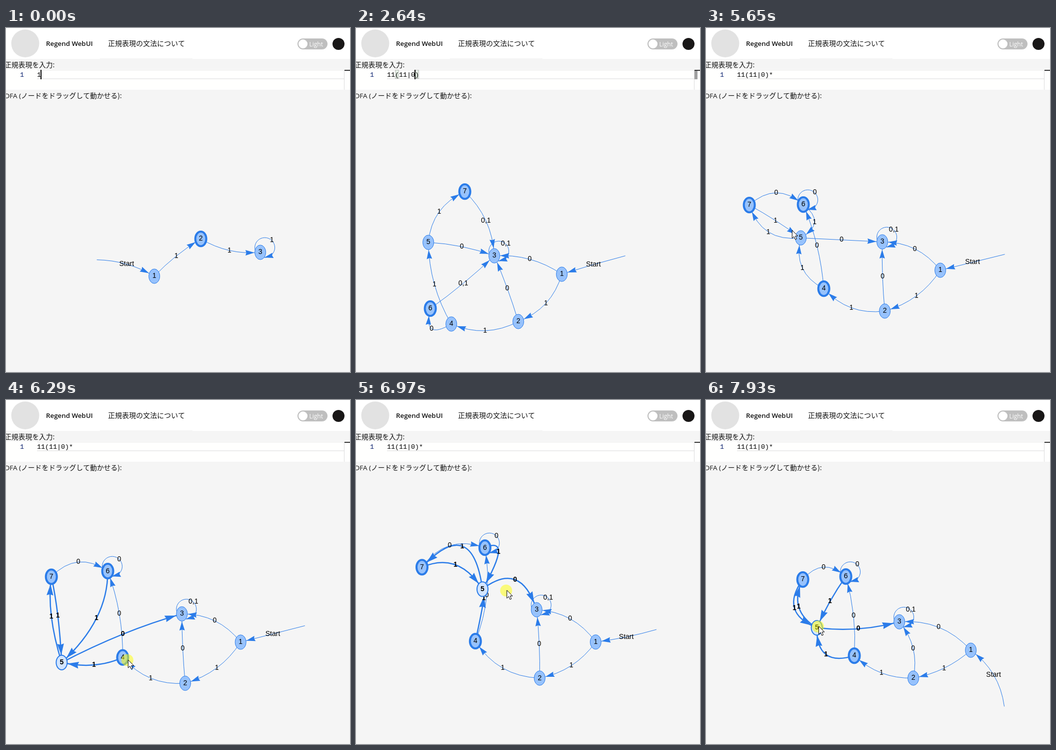
An HTML page with a canvas that plays this animation: 688 px wide and 691 px high, repeating every 8000 ms.

```html
<!DOCTYPE html>
<html lang="ja">
<meta charset="utf-8">
<title>Regend WebUI</title>
<style>
html, body { margin: 0; width: 100%; height: 100%; overflow: hidden; background: #f5f5f5; }
canvas { display: block; }
</style>
<canvas id="stage" width="688" height="691"></canvas>
<script>
const ctx = document.getElementById('stage').getContext('2d');
const LOOP = 8000, FRAME = 68.5, LAST = 7930, HOVER = 4970, GRAB = 5790, BLINK = 530;
const BLUE = '#2b7ce9', RX = 11, RY = 14.6;
const UI = '"Open Sans", "Noto Sans", "Noto Sans CJK JP", sans-serif';
const JP = '"Noto Sans CJK JP", "Noto Sans", sans-serif';
const MONO = '13.333px "Liberation Mono", monospace';
const ARIAL = '14px "Liberation Sans", sans-serif';

const mix = (p, q, k) => p.map((v, i) => v + (q[i] - v) * k);

// ---- graphs: node 0 is the invisible start; each edge bows sideways by its bend ----
const pose = (nodes, bends, drift = [0, 0]) => ({
  nodes: nodes.split(' ').map(p => p.split(',').map(Number)),
  bends: bends.split(' ').map(Number),
  drift // slack of the held node's edges
});
const graph = (accept, edges, pose) => ({
  accept, pose,
  edges: edges.split(' ').map(e => ({ a: +e[0], b: +e[1], label: e.slice(3) }))
});

// A plain run of 1s: n nodes in a row, the last one a dead end.
function chain(n) {
  const edges = ['01:Start'], nodes = [], bends = [];
  for (let i = 0; i <= n; i++) {
    nodes.push([360 + (i - n / 2) * 96, 435 - 25 * Math.cos(i * 1.7)].join());
    bends.push(i % 2 ? 9 : -9);
    if (i) edges.push(`${i}${Math.min(i + 1, n)}:1`);
  }
  return graph([n - 1], edges.join(' '), pose(nodes.join(' '), bends.join(' ')));
}
const single = graph([2], '01:Start 12:1 23:1 33:1',
  pose('181,465 296,498 389,423 508,450', '-8 -4 10'));
const choice = graph([6, 7],
  '01:Start 12:1 13:0 24:1 23:0 45:1 46:0 57:1 53:0 63:0,1 73:0,1 33:0,1',
  pose('538,457 411,494 324,589 276,457 190,594 144,430 148,563 217,328',
    '1 -16 12 -16 2 -11 -31 -18 -5 3 -14'));
const repeat = graph([4, 6, 7],
  '01:Start 12:1 13:0 24:1 23:0 46:0 45:1 53:0 57:1 75:1 76:0 65:1 33:0,1 66:0',
  pose('597,454 468,486 357,568 352,429 235,523 189,421 194,354 86,355',
    '0 -13 16 -17 -2 7 -22 0 -25 -2 -24 -25'));
const two = chain(4), three = chain(5), four = chain(6);
const graphs = [single, two, two, three, four, four, choice, choice, repeat];

const drag = [
  [GRAB, repeat.pose],
  [6630, pose('598,448 471,485 361,570 348,429 224,492 95,548 237,301 106,352',
    '0 -13 16 -17 0 13 -2 -1 36 5 -24 -20', [10, -38])],
  [7380, pose('623,580 553,491 422,443 483,341 375,405 319,308 452,249 376,174',
    '-26 -16 19 -44 22 17 27 -50 -9 37 -34 -26')],
  [LAST, pose('596,615 529,502 414,558 386,445 296,513 221,457 279,354 193,360',
    '14 -9 19 -13 14 7 -32 8 -23 32 -22 3')]
];
const mouse = [[HOVER, [131, 180]], [5650, [172, 407]], [GRAB, [178, 410]],
  [6630, [257, 544]], [7380, [320, 313]], [LAST, [225, 454]]];

// ---- timeline ----
const CODE = '11(11|0)*';
const keyTimes = [-80, 910, 1440, 1770, 1970, 2300, 2570, 3050, 3900];
const typed = t => keyTimes.filter(k => k <= t).length;

function segment(keys, t) {
  const i = Math.max(0, keys.findLastIndex(k => k[0] <= t));
  const a = keys[i], b = keys[i + 1] || a;
  return [a[1], b[1], a === b ? 0 : Math.max(0, (t - a[0]) / (b[0] - a[0]))];
}
const lead = k => 1 - (1 - k) ** 2;
function mousePos(t) {
  const [a, b, k] = segment(mouse, t);
  return mix(a, b, lead(k));
}
// The held node leads, the springs pull the rest after it.
function dragPose(t) {
  const [a, b, k] = segment(drag, t);
  const late = k ** 3;
  return {
    nodes: a.nodes.map((n, i) => mix(n, b.nodes[i], i === 5 ? lead(k) : late)),
    bends: mix(a.bends, b.bends, late),
    drift: mix(a.drift, b.drift, late)
  };
}

// ---- drawing helpers ----
function rect(x, y, w, h, color) {
  ctx.fillStyle = color;
  ctx.fillRect(x, y, w, h);
}
function text(s, x, y, font, color, align = 'left', base = 'alphabetic') {
  ctx.font = font;
  ctx.fillStyle = color;
  ctx.textAlign = align;
  ctx.textBaseline = base;
  ctx.fillText(s, x, y);
}
function oval(x, y, rx, ry, fill, stroke, width) {
  ctx.beginPath();
  ctx.ellipse(x, y, rx, ry, 0, 0, 7);
  if (fill) { ctx.fillStyle = fill; ctx.fill(); }
  if (stroke) { ctx.strokeStyle = stroke; ctx.lineWidth = width; ctx.stroke(); }
}
function shape(points) {
  ctx.beginPath();
  points.forEach(p => ctx.lineTo(...p));
  ctx.closePath();
}
function arrow(x, y, angle, width) {
  const len = 15 + 3 * width;
  ctx.save();
  ctx.translate(x, y);
  ctx.rotate(angle);
  shape([[0, 0], [-len, len * .3], [-len * .9, 0], [-len, -len * .3]]);
  ctx.fillStyle = BLUE;
  ctx.fill();
  ctx.restore();
}
const label = (s, x, y, bold) =>
  text(s, x, y, (bold ? 'bold ' : '') + ARIAL, '#000', 'center', 'middle');

function loopEdge([x, y], s, width) {
  oval(x + 9, y - 9.5, 20, 20, null, BLUE, width);
  arrow(x + 8, y + 10.5, Math.PI - .24, width);
  label(s, x + 23, y - 24, width > 1);
}
function curveEdge(a, b, bend, drift, s, width) {
  const [dx, dy] = [b[0] - a[0], b[1] - a[1]], len = Math.hypot(dx, dy) || 1;
  const off = [drift[0] - dy / len * bend, drift[1] + dx / len * bend];
  const mid = mix(a, b, .5);
  const via = mid.map((v, i) => v + 2 * off[i]);
  const at = t => mix(mix(a, via, t), mix(via, b, t), t);
  ctx.beginPath();
  ctx.moveTo(...a);
  ctx.quadraticCurveTo(...via, ...b);
  ctx.strokeStyle = BLUE;
  ctx.lineWidth = width;
  ctx.stroke();
  // walk back from the end until the node's border is crossed
  const inside = ([x, y]) => Math.hypot((x - b[0]) / (RX + .5), (y - b[1]) / (RY + .5)) < 1;
  let t = 1;
  while (t > 0 && inside(at(t))) t -= .002;
  const tip = at(t), back = at(Math.max(0, t - .1));
  arrow(...tip, Math.atan2(tip[1] - back[1], tip[0] - back[0]), width);
  label(s, mid[0] + off[0], mid[1] + off[1], width > 1);
}
function drawGraph(g, p, held) {
  ctx.save();
  ctx.translate(.6, .6);
  g.edges.forEach(({ a, b, label: s }, i) => {
    const on = a === held || b === held, width = on ? 2.5 : 1;
    if (a === b) loopEdge(p.nodes[a], s, width);
    else curveEdge(p.nodes[a], p.nodes[b], p.bends[i], on ? p.drift : [0, 0], s, width);
  });
  p.nodes.forEach(([x, y], i) => {
    if (!i) return;
    const on = i === held;
    oval(x, y, RX, RY, on ? '#d2e5ff' : '#97c2fc', BLUE, g.accept.includes(i) ? 4 : on ? 2 : 1);
    label(i, x, y, on);
  });
  ctx.restore();
}

function drawPage() {
  rect(0, 0, 688, 691, '#f5f5f5');
  rect(0, 0, 688, 62, '#fff');
  rect(188, 61, 185, 1, '#f3f3f3');
  oval(38.5, 31, 28, 28, '#e2e2e2');
  text('Regend WebUI', 80, 36, '600 13.3px ' + UI, '#111');
  text('正規表現の文法について', 204, 36, '14px ' + JP, '#111');
  ctx.beginPath();
  ctx.roundRect(583, 21, 60, 22, 11);
  ctx.fillStyle = '#bfbfbf';
  ctx.fill();
  oval(594, 32, 9, 9, '#fff');
  text('Light', 606.5, 36.5, '12px ' + UI, '#fff');
  oval(665, 32, 12, 12, '#191717');
  text('正規表現を入力:', -3, 79, '13.8px ' + JP, '#111');
  text('DFA (', 30, 141, '13.5px ' + UI, '#111', 'right');
  text('ノードをドラッグして動かせる):', 30, 141, '13.8px ' + JP, '#111');
}

function drawEditor(t) {
  const n = typed(t), autoClosed = n > 2 && n < 8;
  const code = CODE.slice(0, n) + (autoClosed ? ')' : '');
  rect(0, 83, 688, 41, '#fffffe');
  rect(62, 84, 614, 1, '#e6e6e6');
  rect(62, 101, 614, 2, '#ececec');
  rect(676, 84, 1, 40, '#dcdcdc');
  text('1', 32, 98, MONO, '#0b216f', 'center');
  if (code.endsWith(')')) {
    rect(677, 84, 6, 19, '#a0a0a0');
    for (const c of '()') {
      const x = 62 + 8 * code.indexOf(c);
      rect(x, 84, 8, 18, '#e5efe5');
      ctx.strokeStyle = '#b9b9b9';
      ctx.lineWidth = 1;
      ctx.strokeRect(x + .5, 84.5, 7, 17);
    }
  }
  rect(677, 84, 11, 2, '#333');
  text(code, 62, 98, MONO, '#000');
  const blinkOn = Math.floor((t - keyTimes[n - 1]) / BLINK) % 2 === 0;
  if (blinkOn && t < GRAB) rect(61 + 8 * n, 84, 2, 19, '#000');
}

function drawMouse(t, pressed) {
  const [x, y] = mousePos(t);
  if (pressed) oval(x - 1, y + 1, 12, 12, 'rgba(255,255,0,.5)');
  ctx.save();
  ctx.translate(x + .5, y + .5);
  shape([[0, 0], [0, 16], [3.7, 12.5], [6.3, 18.5], [9, 17.3], [6.5, 11.5], [11.3, 11.5]]);
  ctx.fillStyle = '#fff';
  ctx.fill();
  ctx.strokeStyle = '#000';
  ctx.lineWidth = 1;
  ctx.stroke();
  ctx.restore();
}

function draw(now) {
  const t = now % LOOP, held = t >= GRAB;
  const stepped = LAST + Math.floor((t - LAST) / FRAME + .05) * FRAME;
  const g = graphs[Math.max(1, typed(t - 65)) - 1]; // redrawn a moment after each key
  drawPage();
  drawEditor(t);
  drawGraph(g, held ? dragPose(stepped) : g.pose, held ? 5 : -1);
  if (t >= HOVER) drawMouse(stepped, held);
  requestAnimationFrame(draw);
}
requestAnimationFrame(draw);
</script>
</html>
```
